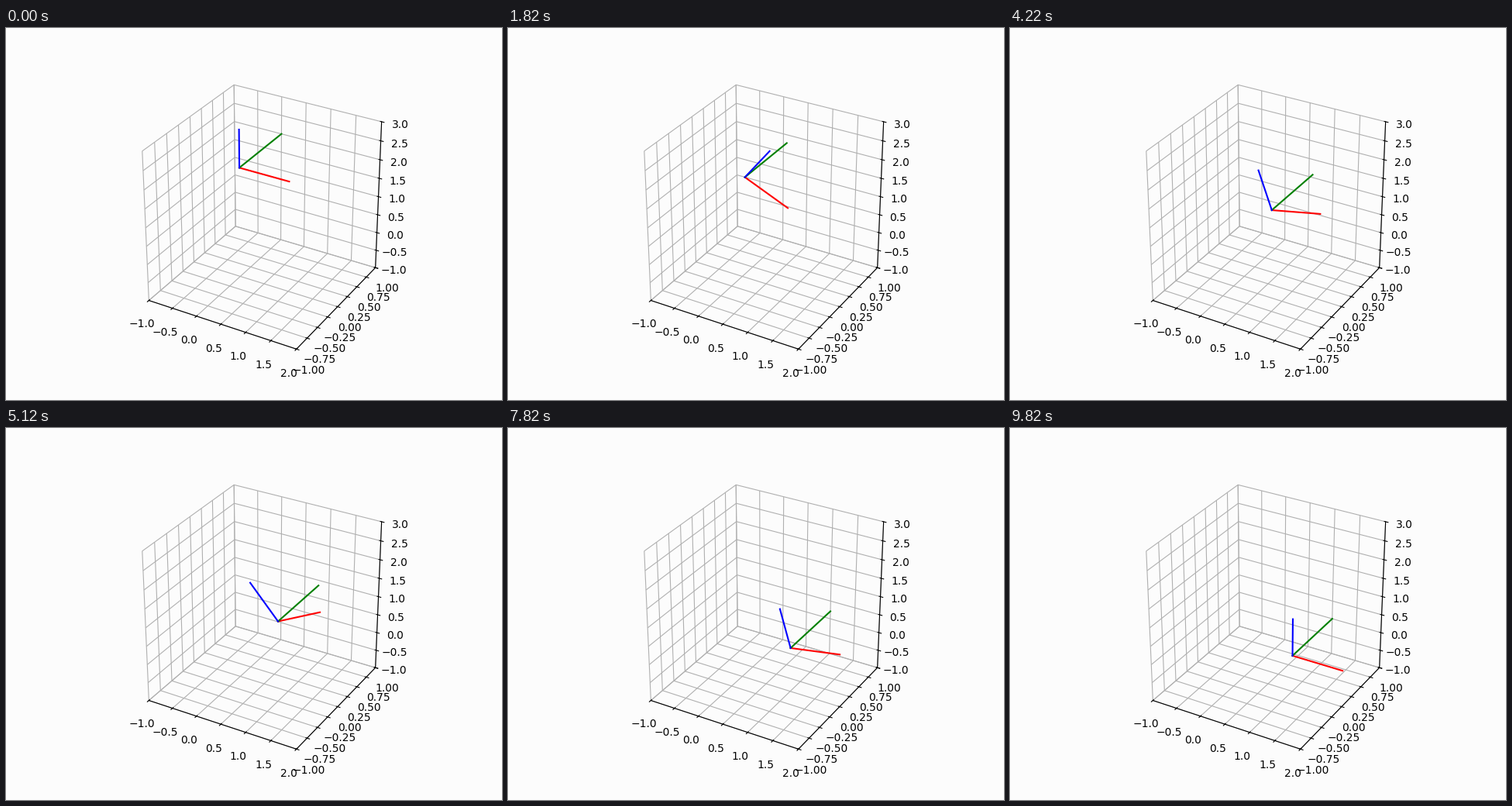
Recreate the animation shown at these times as a matplotlib script. Size 640 by 480 pixels, loop 9920 ms.

```python
import numpy as np
import matplotlib.pyplot as plt
from matplotlib.animation import FuncAnimation
from matplotlib.collections import LineCollection

W, H, DPI = 640, 480, 100
LO = np.array([-1.0, -1.0, -1.0])
HI = np.array([2.0, 1.0, 3.0])
MID, RANGE = (LO + HI) / 2, HI - LO

# Perspective view: elevation 30, azimuth -60, camera distance 10
ELEV, AZIM, DIST = np.radians(30), np.radians(-60), 10
HALF = 1.8294640721620434 * 25 / 24 / np.sqrt(3) / 2
TO_EYE = np.array([np.cos(ELEV) * np.cos(AZIM), np.cos(ELEV) * np.sin(AZIM), np.sin(ELEV)])
RIGHT = np.array([-np.sin(AZIM), np.cos(AZIM), 0])
UP = np.cross(TO_EYE, RIGHT)

# Square plot area inside the default subplot
SIDE = 0.77 * H
SCALE = SIDE / 0.185
SHIFT = SIDE * (0.095 / 0.185 - 0.5)
CX, CY = 0.5125 * W + SHIFT, 0.495 * H + SHIFT


def project(points):
    p = (np.asarray(points, float) - MID) / RANGE * 2 * HALF
    k = SCALE / (DIST - p @ TO_EYE)
    return np.stack([CX + k * (p @ RIGHT), CY + k * (p @ UP)], axis=-1)


fig = plt.figure(figsize=(W / DPI, H / DPI), dpi=DPI, facecolor="#fcfcfc")
ax = fig.add_axes([0, 0, 1, 1])
ax.set(xlim=(0, W), ylim=(0, H))
ax.axis("off")

FAR = np.array([-1.0, 1.0, -1.0])   # corner where the three walls meet
NEAR = LO + HI - FAR
DELTA = 0.08 * RANGE
PAD = 11.5 * 48 / (72 * 2 * SIDE / DPI)


def draw_axis(i, spacing, fmt):
    a, b = [j for j in range(3) if j != i]
    edge = FAR.copy()
    edge[a] = NEAR[a]
    outward = np.sign(edge - MID) * DELTA
    outward[i] = 0
    grid = []
    for v in np.arange(LO[i], HI[i] + spacing / 2, spacing):
        line = np.array([FAR, FAR, FAR])
        line[0, a], line[2, b] = NEAR[a], NEAR[b]
        line[:, i] = v
        grid.append(project(line))

        tick = np.array([line[0], line[0]])
        tick[:, a] += outward[a] * np.array([0.2, -0.1])
        ax.plot(*project(tick).T, color="k", lw=0.8, zorder=2)

        x, y = project(line[0] + PAD * outward)
        ax.text(x, y, (fmt % v).replace("-", "\u2212"), size=10,
                ha="center", va="top", family="DejaVu Sans")
    ax.add_collection(LineCollection(grid, colors="#b0b0b0", linewidths=0.8, zorder=1))

    ends = np.array([edge, edge])
    ends[:, i] = LO[i], HI[i]
    ax.plot(*project(ends).T, color="k", lw=0.8, zorder=2)


draw_axis(0, 0.5, "%.1f")
draw_axis(1, 0.25, "%.2f")
draw_axis(2, 0.5, "%.1f")


def glide(keys, s, stop=False):
    """Cubic path through (time, value) keys; with stop it rests at each key."""
    t, y = np.array(keys, float).T
    m = np.zeros(len(t)) if stop else np.gradient(y, t)
    m[0] = m[-1] = 0
    s = np.clip(s, t[0], t[-1])
    i = min(np.searchsorted(t, s, side="right") - 1, len(t) - 2)
    h = t[i + 1] - t[i]
    u = (s - t[i]) / h
    return (y[i] + (y[i + 1] - y[i]) * u * u * (3 - 2 * u)
            + h * u * (1 - u) * (m[i] * (1 - u) - m[i + 1] * u))


def min_jerk(s):
    s = np.clip(s, 0, 1)
    return s ** 3 * (10 - 15 * s + 6 * s * s)


HEIGHT = [(0, 2), (19, 1.774), (34, 1.321), (52, 0.855), (66, 0.532), (79, 0.212), (99, 0)]
PITCH = [(0, 0), (20.3, 0.53), (57, -0.66), (93, 0)]

arms = [ax.plot([], [], color=c, lw=1.5, zorder=3)[0] for c in "rgb"]


def update(n):
    step = (n + 4) // 5   # the first pose lasts one tick, the others five
    origin = np.array([min_jerk((step - 3) / 74), 0, glide(HEIGHT, step)])
    pitch = glide(PITCH, step, stop=True)
    c, s = np.cos(pitch), np.sin(pitch)
    for arm, d in zip(arms, [(c, 0, -s), (0, 1, 0), (s, 0, c)]):
        arm.set_data(*project([origin, origin + d]).T)
    return arms


anim = FuncAnimation(fig, update, frames=496, interval=20, repeat=True, repeat_delay=0)
plt.show()
```
